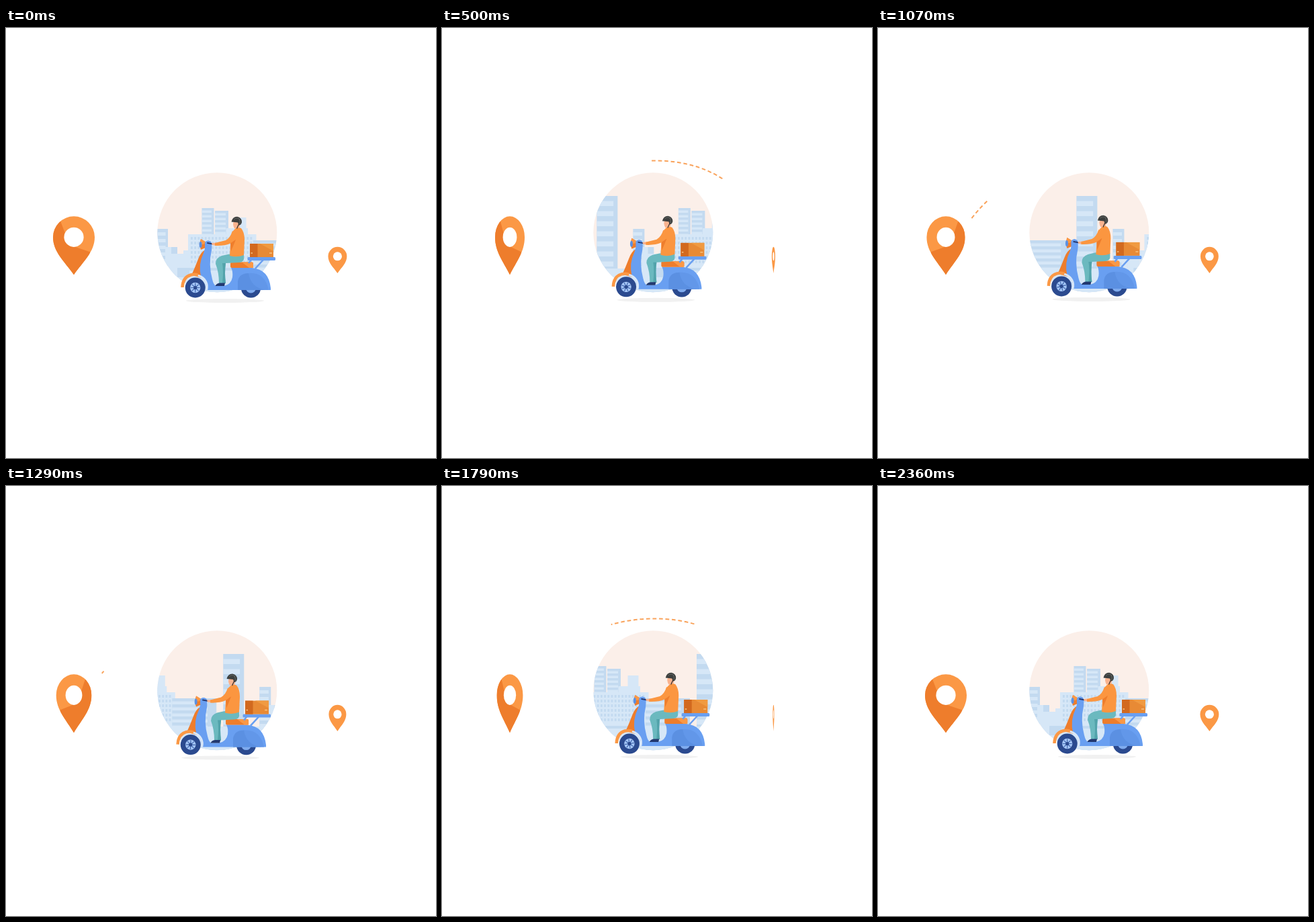
An HTML page for the animation above (2430 ms loop, 640 by 640 pixels).

```html
<!DOCTYPE html>
<html lang="en">
<head>
<meta charset="utf-8">
<title>Scooter delivery</title>
<style>
  html, body { margin: 0; width: 100%; height: 100%; overflow: hidden; background: #fff; }
  svg { display: block; width: 100%; height: 100%; }
</style>
</head>
<body>
<svg viewBox="0 0 640 640">
  <defs>
    <clipPath id="disc"><circle cx="314.3" cy="304.3" r="89"/></clipPath>
    <path id="drop" d="M0 56C-14 36-31 22-31 0A31 31 0 0 1 31 0C31 22 14 36 0 56Z"/>
    <clipPath id="dropClip"><use href="#drop"/></clipPath>
    <g id="city"></g>
  </defs>

  <circle cx="314.3" cy="304.3" r="89" fill="#fbefe9"/>
  <g clip-path="url(#disc)">
    <g id="skyline">
      <use href="#city"/>
      <use href="#city" x="-274"/>
      <use href="#city" x="-548"/>
    </g>
  </g>

  <path id="route" fill="none" stroke="#f9a35c" stroke-width="2"
    d="M488 316C460 244 406 197.4 316 197.4C246 197.4 182 227 138 285"/>

  <g transform="translate(101 311.3)">
    <g id="pinA">
      <use href="#drop" fill="#fb9845"/>
      <path clip-path="url(#dropClip)" fill="#ee7d2c" d="M-20-24L-12-3L3 15L24 22L20 60H-40V-24Z"/>
      <circle r="14.6" fill="#fff"/>
    </g>
  </g>
  <g transform="translate(493.4 339.8) scale(.45)">
    <g id="pinB">
      <use href="#drop" fill="#fb9845"/>
      <circle r="14.6" fill="#fff"/>
    </g>
  </g>

  <g id="scooter">
    <ellipse cx="326" cy="406" rx="58" ry="3" fill="#f1f1f1"/>

    <!-- rear wheel -->
    <circle cx="364.5" cy="387" r="14.6" fill="#2b4a8f"/>
    <circle cx="364.5" cy="387" r="7.5" fill="#7fabee"/>

    <!-- front panel and body -->
    <path fill="#ee7d2c" d="M297 330Q290 333 286 344Q281 357 276 368L291 372Z"/>
    <path fill="#699ff1" d="M296 319Q300 314.5 305 318Q307 321 306 331Q301 352 307 374Q309 383 313 384H324Q335 382 337 371Q338 362 335 357H366Q391 359 394 387V390H298Q299 377 290 370Q286 351 294 335Q297 328 296 319Z"/>
    <path fill="#5b90e2" d="M345 390V377Q347 365 361 365Q380 370 386 390Z"/>
    <path fill="#6297e9" d="M361 365Q385 363 391 390H386Q364 386 361 365Z"/>

    <!-- front wheel -->
    <path fill="none" stroke="#d9e7f8" stroke-width="3" d="M266 380A17 17 0 0 1 298.5 390"/>
    <path fill="none" stroke="#fb9845" stroke-width="4.5" d="M262.5 386Q263 371 275 367.5Q281 366 286 368"/>
    <g transform="translate(281.7 386.5)">
      <circle r="15" fill="#2b4a8f"/>
      <g id="hub">
        <circle r="7.7" fill="#a5c6f6"/>
        <path id="spokes" stroke="#3f65ad" stroke-width="1.2"/>
        <circle r="2.6" fill="#2b4a8f"/>
      </g>
    </g>

    <!-- headlight and handlebar -->
    <path fill="#ee7d2c" d="M290 314L298 319L297 327L290 330Q287 322 290 314Z"/>
    <path fill="#fb9845" d="M290 314L298 319L294 322L289 322Z"/>
    <ellipse cx="289.6" cy="322.5" rx="2" ry="4.5" fill="#5b90e2"/>
    <path fill="#699ff1" d="M296 319Q300 314.5 305 318V326L296 327Z"/>
    <path stroke="#263a70" stroke-width="2" stroke-linecap="round" d="M300 320L308 321.5"/>

    <!-- seat, rack, parcel -->
    <rect x="334" y="348.5" width="34" height="8.5" rx="2" fill="#ee7d2c"/>
    <path fill="#fb9845" d="M351 348.5H366Q368 349 368 351V357H362Z"/>
    <path fill="none" stroke="#699ff1" stroke-width="2.5" d="M383 345L371 358M365 345L361 350"/>
    <rect x="359.5" y="341" width="41.5" height="5" rx="1.5" fill="#699ff1"/>
    <rect x="363" y="321" width="35" height="20" fill="#e88a35"/>
    <rect x="363" y="321" width="11.5" height="20" fill="#d2691f"/>
    <path fill="#f09a41" d="M378 321H398V332Z"/>
    <path stroke="#f7c27f" stroke-width="1.5" d="M392 335H396M364.5 335H367"/>

    <!-- rider -->
    <path fill="#6bb9bf" d="M354 337V344Q353 348.5 347 349L327 350Q325 364 327 380H317Q317 364 312 351Q312 342 321 339Q337 334 354 337Z"/>
    <path fill="#52a3ab" d="M327 350Q325 364 327 380H322Q324 362 322 350Z"/>
    <path fill="#22386f" d="M311.5 384Q313 380 318 379.5H326L325 384Z"/>
    <path fill="#f9b38f" d="M339 288H348V295L346 300L341 299Q338 296 338 291Z"/>
    <path fill="#f9b38f" d="M306 320L313 319.5V324L307 323Z"/>
    <path fill="#fb9640" d="M341 299Q346 296 350 298Q355 304 355 315L354 338Q344 342 333 339Q334 320 335 309Q336 303 341 299Z"/>
    <path fill="#ee7d2c" d="M334 319L342 315L335 332Z"/>
    <path fill="#fb9640" d="M337 302Q334 312 327 316L311 320V324Q326 324.5 333 321Q342 316 345 309Z"/>
    <path fill="#3d403f" d="M335.500 288.500Q337 281 344 280.800Q351 282 351 289Q350 293.500 346.500 293.500L345 289.500Z"/>
    <path fill="none" stroke="#6d706c" stroke-width=".8" d="M339 285Q344 281 348 285M347 284Q349 288 348 292"/>
    <path fill="none" stroke="#222" stroke-width="1.1" d="M346.5 292L343.5 298.5"/>
  </g>
</svg>

<script>
const $ = id => document.getElementById(id);
const LIGHT = '#d6e7f7', MID = '#c3daf0';
const GROUND = 394, TILE = 274;
const LOOP = 2430, STEPS = 34, LAST = 59;

const box = (x, y, w, h, fill) =>
  `<rect x="${x}" y="${y}" width="${w}" height="${h}" fill="${fill}"/>`;
const block = (x, top, w, fill = LIGHT) => box(x, top, w, GROUND - top, fill);

// Dark tower with a light band on every floor
function tower(x, top, w, floor) {
  let out = block(x, top, w, MID);
  for (let y = top + floor / 2; y < GROUND; y += floor)
    out += box(x, y, w * .8, floor / 2, LIGHT);
  return out;
}

function windows(x0, y0, cols, rows) {
  let out = '';
  for (let i = 0; i < cols * rows; i++)
    out += box(x0 + i % cols * 5.2, y0 + Math.floor(i / cols) * 7, 2.8, 4, MID);
  return out;
}

$('city').innerHTML =
  tower(291.5, 268, 18, 7) + tower(311, 272, 20, 7) +
  block(341.5, 282, 16) + block(327.5, 298, 32.5) +
  block(271, 307, 101.5) + windows(275, 311, 18, 6) +
  tower(368, 316, 66, 9) + tower(444, 250, 31, 15) + tower(498, 299, 17, 10) +
  block(511, 326, 9) + block(520, 326, 9, MID) +
  block(520, 336, 18) + block(538, 331, 7.5) +
  block(271, 358, TILE + .5) + box(529, 357, 18, 14, MID) + box(271, 357, 80, 4, MID);

$('spokes').setAttribute('d', Array.from({ length: 8 }, (_, i) => {
  const a = i * Math.PI / 4;
  return `M0 0L${7 * Math.cos(a)} ${7 * Math.sin(a)}`;
}).join(''));

const ramp = (t, from, to) => Math.min(1, Math.max(0, (t - from) / (to - from)));
const ease = (t, from, to) => {
  const u = ramp(t, from, to);
  return u * u * (3 - 2 * u);
};

const route = $('route');
const routeLength = route.getTotalLength();

// Dashes only between two fractions of the route
function drawRoute(a, b) {
  let left = Math.abs(b - a) * routeLength;
  route.style.visibility = left > 1 ? 'visible' : 'hidden';
  const dashes = [0, Math.min(a, b) * routeLength];
  for (; left > 0; left -= 9.5) dashes.push(Math.min(5.7, left), 3.8);
  dashes.push(0, 999);
  route.setAttribute('stroke-dasharray', dashes.join(' '));
}

const move = (id, value) => $(id).setAttribute('transform', value);
const flip = turn => `scale(${Math.cos(turn * 2 * Math.PI).toFixed(4)} 1)`;

function draw(now) {
  // The picture steps 34 times per loop through 60 evenly spaced poses
  const step = Math.floor(now % LOOP / LOOP * STEPS + .1) % STEPS;
  const t = Math.ceil(step * LAST / (STEPS - 1));
  const p = t / LAST;

  const ride = 9.4 * (ease(t, 20, LAST) - ease(t, 0, 18));
  const bump = Math.sin(Math.PI * ramp(t, 20, 46)) ** 2;
  move('scooter', `translate(${ride} ${1.6 * bump - 3 * ease(t, 8, 20)})`);
  move('skyline', `translate(${p * TILE} 0)`);
  move('hub', `rotate(${-720 * p})`);
  move('pinA', flip(ease(t, 0, LAST)));
  move('pinB', flip(p));

  // The dashes run to the left pin, then back
  const back = t > 30.5;
  const leg = back ? t - 30.5 : t;
  const head = ease(leg, 0, 25), tail = ramp(leg, 0, 28.5) ** 1.65;
  if (back) drawRoute(1 - tail, 1 - head);
  else drawRoute(tail, head);
}

function loop(now) {
  draw(now);
  requestAnimationFrame(loop);
}
draw(0);
requestAnimationFrame(loop);
</script>
</body>
</html>
```
